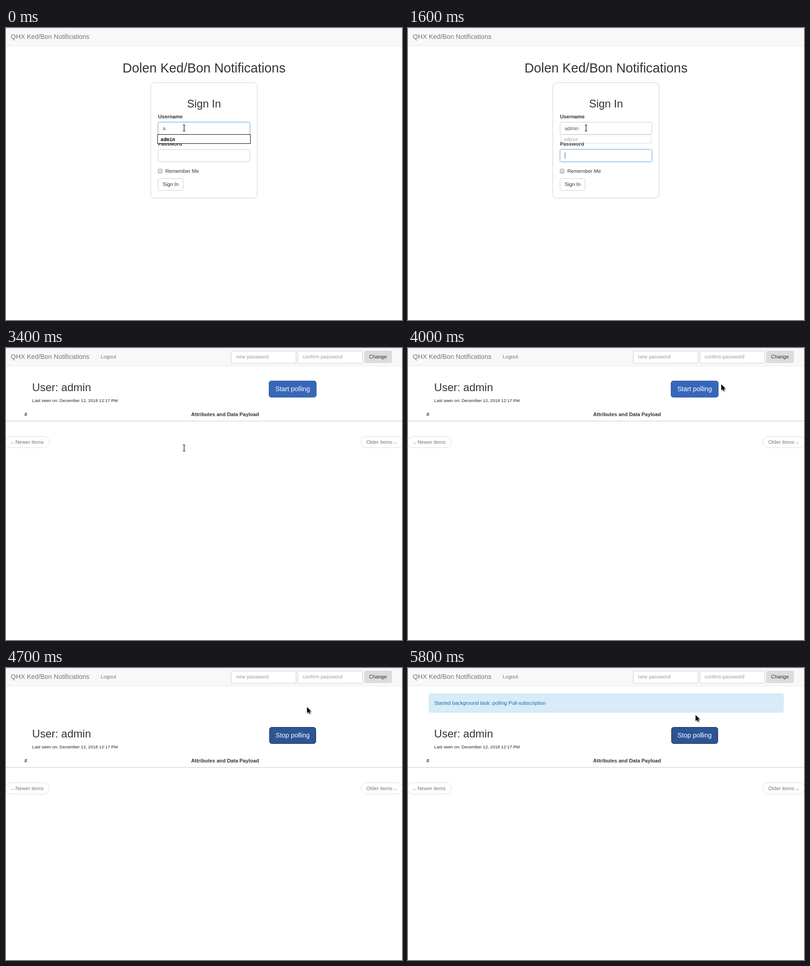
An HTML page with a canvas for the animation above (8 s loop, 871x643 px).

```html
<!DOCTYPE html>
<html lang="en">
<head>
<meta charset="utf-8">
<title>Sign in and start polling</title>
<style>
html, body { margin: 0; width: 100%; height: 100%; overflow: hidden; background: #fff; }
canvas { display: block; }
</style>
</head>
<body>
<canvas id="stage" width="871" height="643"></canvas>
<script>
const ctx = document.getElementById('stage').getContext('2d');
const LOOP = 8000;
const SANS = '"Liberation Sans", Arial, sans-serif';
const MONO = '"Liberation Mono", monospace';
const BASE = 11.2;

// Last entry of [time, value] pairs whose time has been reached.
function at(steps, t) {
  let value = steps[0][1];
  for (const [start, v] of steps) if (t >= start) value = v;
  return value;
}

function text(str, x, y, { size = BASE, color = '#333', bold = false, align = 'left', font = SANS } = {}) {
  ctx.font = `${bold ? 'bold ' : ''}${size}px ${font}`;
  ctx.fillStyle = color;
  ctx.textAlign = align;
  ctx.fillText(str, x, y);
}

function box(x, y, w, h, r, fill, stroke) {
  ctx.beginPath();
  ctx.roundRect(x + 0.5, y + 0.5, w - 1, h - 1, r);
  ctx.fillStyle = fill;
  ctx.fill();
  if (stroke) {
    ctx.strokeStyle = stroke;
    ctx.lineWidth = 1;
    ctx.stroke();
  }
}

function rect(x, y, w, h, color) {
  ctx.fillStyle = color;
  ctx.fillRect(x, y, w, h);
}

function field(x, y, w, focused) {
  if (focused) {
    ctx.save();
    ctx.shadowColor = 'rgba(102,175,233,0.5)';
    ctx.shadowBlur = 5;
    box(x, y, w, 28, 3, '#fff');
    ctx.restore();
  }
  box(x, y, w, 28, 3, '#fff', focused ? '#66afe9' : '#ccc');
}

function navbar() {
  rect(0, 0, 871, 40, '#f8f8f8');
  rect(0, 0, 871, 1, '#e2e2e2');
  rect(0, 39, 871, 1, '#e7e7e7');
  text('QHX Ked/Bon Notifications', 10.6, 24, { size: 14.4, color: '#777' });
}

// Suggestion list; it shrinks towards its centre as it fades.
function suggestions(alpha, scale) {
  if (!alpha) return;
  ctx.save();
  ctx.globalAlpha = alpha;
  ctx.translate(435.5, 244.5);
  ctx.scale(scale, scale);
  box(-102.5, -10.5, 205, 21, 0, '#fff', scale < 1 ? '#777' : '#000');
  text('admin', -95.5, 4.5, { size: 10.67, color: '#000', bold: true, font: MONO });
  ctx.restore();
}

function signInPage(t) {
  navbar();
  text('Dolen Ked/Bon Notifications', 435.5, 98, { size: 28.8, align: 'center' });
  box(318, 120, 235, 255, 8, '#fff', '#ccc');
  text('Sign In', 435.5, 175, { size: 24, align: 'center' });

  const onPassword = t >= 1400;
  text('Username', 334.4, 199, { bold: true });
  field(334, 207, 203, !onPassword);
  const typed = at([[0, 1], [400, 2], [500, 3], [700, 4], [800, 5]], t);
  text('admin'.slice(0, typed), 344.8, 225, { color: '#555' });

  text('Password', 334.4, 259, { bold: true });
  field(334, 267, 203, onPassword);
  if (t >= 2400) text('•'.repeat(11), 344.8, 285, { color: '#555' });
  const caret = at([[0, 0], [1400, 345], [2100, 0], [2400, 388], [3100, 0]], t);
  if (caret) rect(caret, 274, 1, 13, '#444');

  const fade = ctx.createLinearGradient(0, 310, 0, 320);
  fade.addColorStop(0, '#e8e8e8');
  fade.addColorStop(1, '#cfcfcf');
  box(334, 310, 10, 10, 1.5, fade, '#a3a3a3');
  text('Remember Me', 350.4, 319);
  box(334, 331, 56, 27, 3, '#fff', '#ccc');
  text('Sign In', 344.8, 348);

  suggestions(...at([[0, [1, 1]], [1400, [0.85, 0.99]], [1500, [0.55, 0.98]], [1600, [0.27, 0.97]], [1700, [0, 1]]], t));
}

const BUTTON = {
  normal: ['#3767b9', '#2f5ba6'],
  hover: ['#2d5494', '#25477e'],
  pressed: ['#25467c', '#1a3158'],
  focus: ['#2d5494', '#1a3158']
};

function alertBar(t) {
  const p = Math.min(1, (t - 4600) / 1200);
  ctx.save();
  ctx.globalAlpha = 0.5 - Math.cos(Math.PI * p) / 2;
  box(46, 56, 780, 42, 3, '#d7ebf8', '#bce4f1');
  text('Started background task: polling Pull-subscription', 58, 81, { color: '#286798' });
  ctx.restore();
}

function userPage(t) {
  navbar();
  text('Logout', 208.2, 23, { color: '#777' });
  field(495, 6, 143.5, false);
  text('new password', 506, 23, { color: '#999' });
  field(641.5, 6, 143.5, false);
  text('confirm password', 652.3, 23, { color: '#999' });
  box(788, 6, 60.5, 27, 3, '#dcdcdc', '#d4d4d4');
  text('Change', 818.2, 23, { align: 'center' });

  const polling = t >= 4700;
  if (polling) alertBar(at([4700, 4900, 5100, 5300, 5700, 5800].map(s => [s, s]), t));

  ctx.save();
  if (polling) ctx.translate(0, 58);
  text('User: admin', 57.6, 95, { size: 24 });
  text('Last seen on: December 12, 2018 12:17 PM', 57.6, 119, { size: 9.6, color: '#222' });

  const look = at([[0, 'normal'], [3800, 'hover'], [4000, 'normal'], [4300, 'hover'], [4500, 'pressed'], [4700, 'focus']], t);
  const width = polling ? 103 : 105;
  box(630.5 - width / 2, 72, width, 37, 5, ...BUTTON[look]);
  text(polling ? 'Stop polling' : 'Start polling', 630.4, 95, { size: 14.4, color: '#fff', align: 'center' });

  text('#', 43.6, 150, { bold: true, align: 'center' });
  text('Attributes and Data Payload', 481.8, 150, { bold: true, align: 'center' });
  rect(0, 160, 871, 1.5, '#d8d8d8');

  box(-2, 194, 98, 26, 12.5, '#fff', '#ddd');
  text('←Newer items', 9.6, 211, { color: '#777' });
  box(780, 194, 93, 26, 12.5, '#fff', '#ddd');
  text('Older items→', 792.6, 211, { color: '#777' });
  ctx.restore();
}

function outline(points, fill, edge) {
  ctx.beginPath();
  points.forEach(([x, y]) => ctx.lineTo(x, y));
  ctx.closePath();
  ctx.lineJoin = 'round';
  ctx.strokeStyle = edge;
  ctx.lineWidth = 2;
  ctx.stroke();
  ctx.fillStyle = fill;
  ctx.fill();
}

const POINTERS = {
  beam() {
    const bars = [[-2, -7, 5, 1], [0, -6, 1, 12], [-2, 6, 5, 1]];
    for (const [x, y, w, h] of bars) rect(x + 1, y + 1, w, h, 'rgba(0,0,0,0.3)');
    for (const [x, y, w, h] of bars) rect(x, y, w, h, '#222');
  },
  arrow() {
    ctx.save();
    ctx.shadowColor = 'rgba(0,0,0,0.35)';
    ctx.shadowBlur = 2;
    ctx.shadowOffsetX = ctx.shadowOffsetY = 1;
    outline([[0, 0], [0, 13], [3, 10.3], [5, 14.5], [7, 13.6], [5.1, 9.4], [9, 9.2]], '#000', '#fff');
    ctx.restore();
  },
  hand() {
    outline([[-1, 0], [1, 0], [1.5, 5], [4, 5], [7, 6], [9, 7], [9, 12], [7, 16], [0, 16], [-2, 13], [-5, 9], [-4, 8], [-1, 10]], '#fff', '#111');
  }
};

function pointer(t) {
  const [kind, x, y] = at([
    [0, ['beam', 391, 220]],
    [2900, ['arrow', 391, 220]],
    [3400, ['beam', 391, 220]],
    [3800, ['hand', 682, 82]],
    [4000, ['arrow', 689, 80]],
    [4300, ['hand', 662, 86]],
    [4700, ['arrow', 662, 86]],
    [5700, ['arrow', 640, 99]],
    [5800, ['arrow', 632.5, 103.5]]
  ], t);
  ctx.save();
  ctx.translate(x, y);
  POINTERS[kind]();
  ctx.restore();
}

function draw(t) {
  rect(0, 0, 871, 643, '#fff');
  if (t < 3400) signInPage(t);
  else userPage(t);
  pointer(t);
}

const begin = performance.now();
function tick() {
  draw((performance.now() - begin) % LOOP);
  requestAnimationFrame(tick);
}
tick();
</script>
</body>
</html>
```
